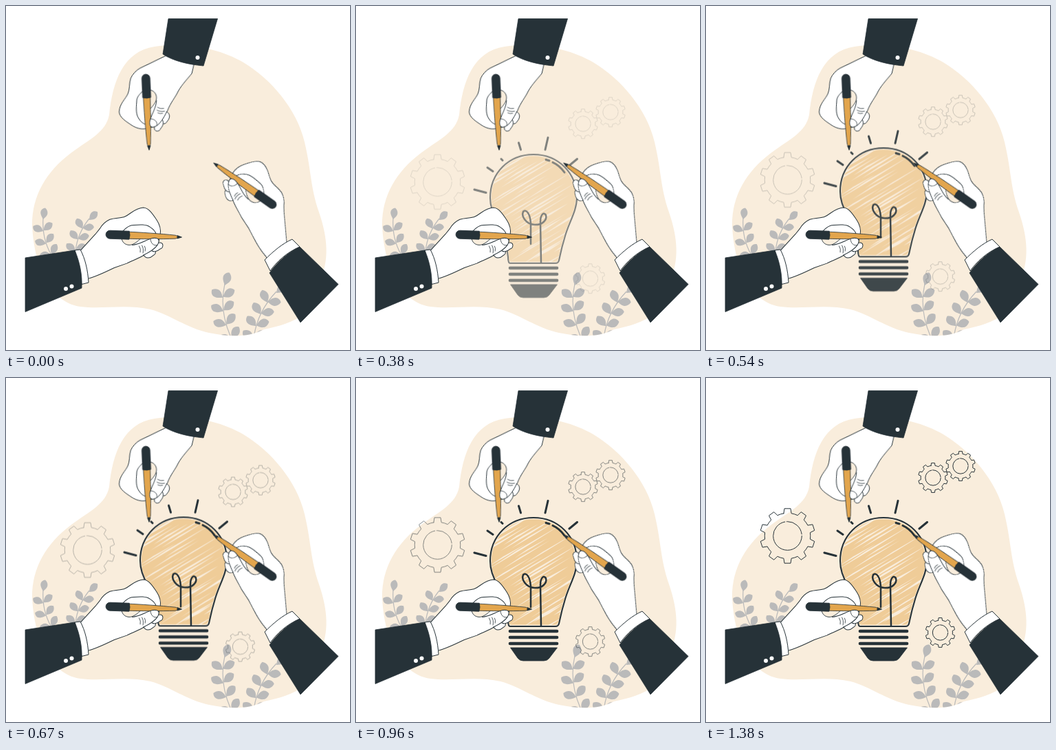
An HTML page that plays this animation: 500x500 px, repeating every 1.43 s.

```html
<!DOCTYPE html>
<html lang="en">
<head>
<meta charset="utf-8">
<title>Drawing an idea</title>
<style>
  html, body { margin: 0; width: 100%; height: 100%; overflow: hidden; background: #fff; }
  svg { display: block; width: 100vw; height: 100vh; }
  .ink { fill: #263238; stroke: #263238; stroke-width: .8; }
  .line { fill: none; stroke: #263238; stroke-linecap: round; stroke-linejoin: round; }
  .paper { fill: #fff; stroke: #263238; stroke-width: 1; stroke-linejoin: round; }
  .sand { fill: #f9eddc; }
  .leaf { fill: #bababa; }
  .stem { fill: none; stroke: #bababa; stroke-width: 1.2; }
  .wood { fill: #e2a54d; stroke: #263238; stroke-width: .8; }
</style>
</head>
<body>
<svg viewBox="0 0 500 500">
  <defs>
    <path id="blob" d="M38 318C38 276 58 241 94 214C122 193 145 184 150 158C155 110 170 66 216 59C262 52 311 62 345 82C385 106 423 150 434 198C444 240 442 262 455 300C468 338 470 370 456 400C454 446 420 461 375 470C352 482 325 481 295 475C262 468 240 449 210 441C175 433 140 441 108 437C60 430 40 370 38 318Z"/>
    <path id="glass" d="M195 266C195 230 222 203 258 203C294 203 321 230 321 266C321 286 308 304 303 325C298 341 297 349 295 357C294 361 292 361 290 361L224 361C221 361 221 356 221 352C219 331 214 317 206 301C198 288 195 278 195 266Z"/>
    <clipPath id="inBlob"><use href="#blob"/></clipPath>
    <clipPath id="inGlass"><use href="#glass"/></clipPath>
  </defs>
  <use href="#blob" class="sand"/>
  <g id="plants" clip-path="url(#inBlob)"></g>
  <g id="gears"></g>
  <g id="bulb">
    <g clip-path="url(#inGlass)">
      <use href="#glass" fill="#efcc98" transform="translate(258 282) scale(.972) translate(-258 -282)"/>
      <g id="streaks" class="sand"></g>
    </g>
    <use href="#glass" class="line" stroke-width="2.1"/>
    <path class="line" stroke-width="2.5" d="M254 333L254 303C253 288 247 282 243 286C240 293 247 304 259 305C271 306 278 298 276 291C273 286 268 290 268 301L269 360"/>
    <path class="line" stroke-width="3" d="M276 210.500L281 212M286 214.500Q296 219 303 229"/>
    <path class="line" stroke-width="3" d="M236.500 186L239.500 196M279 178.500L275 196M321.500 209.500L310 219M191 222L199 227.500M172 254L189 258.500M211 209.500L213 211.500"/>
    <path class="line" stroke-width="4.700" d="M224 368H292M224 377H292M224 386H292"/>
    <path class="ink" d="M224.500 392H292.500L281 407Q278 411 273 411H243Q238 411 235 407Z"/>
  </g>
  <g id="hands"></g>
  <g>
    <path class="ink" d="M236 18.500H307.500L287 87C265 85 243 80 228 70Z"/>
    <circle cx="278.500" cy="75" r="3" fill="#fff"/>
    <path class="paper" d="M100 355L108 354C115 367 119 384 120 402L110 404.500Z"/>
    <path class="ink" d="M28 366L100 355C107 372 111 390 110 410L28 444.500Z"/>
    <circle cx="87" cy="411" r="3" fill="#fff"/>
    <circle cx="95.500" cy="407.500" r="3" fill="#fff"/>
    <path class="paper" d="M376 369C388 357 402 345 416 339L427 350C408 358 393 372 384 385Z"/>
    <path class="ink" d="M427 350L483 404.500L428 460L383 388C395 371 410 358 427 350Z"/>
  </g>
</svg>
<script>
const $ = id => document.getElementById(id);
const rad = Math.PI / 180;

// A curved stem with pairs of leaves and one leaf at the end.
function branch([x0, y0], [cx, cy], [x1, y1], pairs, size) {
  const leaf = (x, y, turn, s = size) =>
    `<path class="leaf" transform="translate(${x} ${y}) rotate(${turn}) scale(${s})" d="M0 0C-2 -3 -6 -7 -6 -12C-6 -16 -3 -19 1 -20C5 -17 7 -13 6 -9C5 -5 2 -3 0 0Z"/>`;
  let out = `<path class="stem" d="M${x0} ${y0}Q${cx} ${cy} ${x1} ${y1}"/>`;
  for (let i = 0; i <= pairs; i++) {
    const t = i / pairs, u = 1 - t;
    const x = u * u * x0 + 2 * u * t * cx + t * t * x1;
    const y = u * u * y0 + 2 * u * t * cy + t * t * y1;
    const dx = u * (cx - x0) + t * (x1 - cx), dy = u * (cy - y0) + t * (y1 - cy);
    const turn = Math.atan2(dx, -dy) / rad;
    out += i === pairs ? leaf(x, y + 2, turn + 4)
      : leaf(x, y, turn - 60) + leaf(x, y - 1, turn + 55);
  }
  return out;
}

function gear(x, y, r, teeth) {
  const step = 360 / teeth, root = r * .83;
  const at = (deg, d) => `${(x + d * Math.sin(deg * rad)).toFixed(1)} ${(y - d * Math.cos(deg * rad)).toFixed(1)}`;
  let d = '';
  for (let i = 0; i < teeth; i++) {
    const a = i * step;
    d += `${i ? 'L' : 'M'}${at(a - step * .27, root)}L${at(a - step * .18, r)}` +
      `L${at(a + step * .18, r)}L${at(a + step * .27, root)}` +
      `A${root} ${root} 0 0 1 ${at(a + step * .73, root)}`;
  }
  const hole = r * .52;
  return `<path class="line" d="${d}Z"/><circle class="line" cx="${x}" cy="${y}" r="${hole}" ` +
    `pathLength="100" stroke-dasharray="72 2 24 2"/>`;
}

// Light tapered strokes left open by the scribbled fill.
function streaks(count) {
  let seed = 7, out = '';
  const rnd = () => (seed = seed * 16807 % 2147483647) / 2147483647;
  for (let i = 0; i < count; i++) {
    const y = -82 + i * 172 / count + rnd() * 4;
    const x = -75 + rnd() * 70, len = 50 + rnd() * 75, w = .7 + rnd() * 1.1;
    out += `<path d="M${x} ${y}L${x + len * .4} ${y - w}L${x + len} ${y + 1}L${x + len * .5} ${y + w}Z"/>`;
  }
  return `<g transform="translate(258 278) rotate(-32)">${out}</g>`;
}

// Pencil tip at the origin, pencil lying along negative x.
function hand(place, start, wrist) {
  return `<g transform="${place}">
    <path class="paper" d="M${start}L-118 -8C-115 -14 -110 -19 -104 -22C-96 -25 -88 -24 -82 -27C-74 -31 -68 -40 -56 -41C-48 -41 -42 -32 -36 -24C-31 -17 -29 -10 -30 -3L-32 8L-54 29${wrist}"/>
    <path class="line" d="M-84 -6C-79 -12 -75 -15 -69 -15C-60 -16 -51 -17 -45 -13C-40 -10 -37 -7 -36 -3"/>
    <path class="sand" stroke="#263238" stroke-width=".9" d="M-86 3C-86 10 -80 15 -73 14C-67 13 -62 8 -58 4Z"/>
    <path class="paper" d="M-53 28C-54 23 -48 18 -41 19C-35 19 -34 25 -39 28C-44 33 -50 33 -53 28Z"/>
    <path class="paper" d="M-44 19C-42 13 -35 9 -29 9C-24 10 -25 17 -29 18C-34 23 -40 24 -44 19Z"/>
    <path class="wood" d="M0 0L-8 -2.500C-30 -4 -60 -5 -77 -5V5C-60 5 -30 4 -8 2.500Z"/>
    <path class="ink" d="M1.500 0L-5 -2.200V2.200Z"/>
    <path class="ink" d="M-75 -6H-103A6 6 0 0 0 -103 6H-75Q-73 0 -75 -6Z"/>
    <path fill="#fff" d="M-72 15C-60 14 -52 7 -44 4C-36 1 -30 3 -32 9C-34 17 -44 24 -53 28Z"/>
    <path class="line" d="M-70 14C-60 13 -52 7 -44 4C-36 1 -30 3 -32 9C-34 17 -44 23 -53 28"/>
    <path class="line" stroke-width=".8" d="M-44 4C-43 11 -39 14 -34 13M-60 15Q-57 19 -58 24M-56 14Q-53 18 -54 25M-52 15Q-50 18 -51 22"/>
  </g>`;
}

$('plants').innerHTML =
  branch([66, 362], [52, 338], [54, 308], 3, .84) +
  branch([101, 356], [104, 330], [121, 309], 3, .84) +
  branch([328, 484], [309, 443], [318, 404], 4, .98) +
  branch([360, 484], [364, 446], [393, 415], 4, .98);
$('gears').innerHTML = gear(118.5, 229.5, 40, 10) +
  [[330, 145], [370, 128], [340.5, 370]].map(([x, y]) => gear(x, y, 21.5, 10)).join('');
$('streaks').innerHTML = streaks(34);

const start = '-152 33L-124 0';
const slim = 'C-62 34 -70 37 -77 41L-95 48C-110 56 -122 62 -132 65L-146 69';
const wide = 'C-66 34 -74 42 -82 46C-92 52 -101 62 -107 67L-125 72';
$('hands').innerHTML =
  hand('translate(208 208) rotate(87.4) scale(1 -1)', '-139 41', wide) +
  hand('translate(303 229) rotate(215.3) scale(1 -1)', start, slim) +
  hand('translate(254 336) rotate(2.1)', start, slim);

const loop = 1430, fps = 24;
const rise = (el, duration, easing) => {
  const anim = el.animate([
    { opacity: 0, transform: 'translateY(30px)' },
    { opacity: 1, transform: 'translateY(0px)' }
  ], { duration, easing, fill: 'both' });
  anim.pause();
  return anim;
};
const parts = [
  rise($('bulb'), 1000, 'cubic-bezier(.36, -.01, .5, 1.38)'),
  rise($('gears'), 34000 / fps, 'ease-in')
];

function draw() {
  const t = performance.now() % loop;
  const step = Math.min(33, Math.floor((t + 5) * fps / 1000));
  const time = step < 2 ? 0 : (step + 1) * 1000 / fps;
  for (const p of parts) p.currentTime = time;
  requestAnimationFrame(draw);
}
draw();
</script>
</body>
</html>
```
